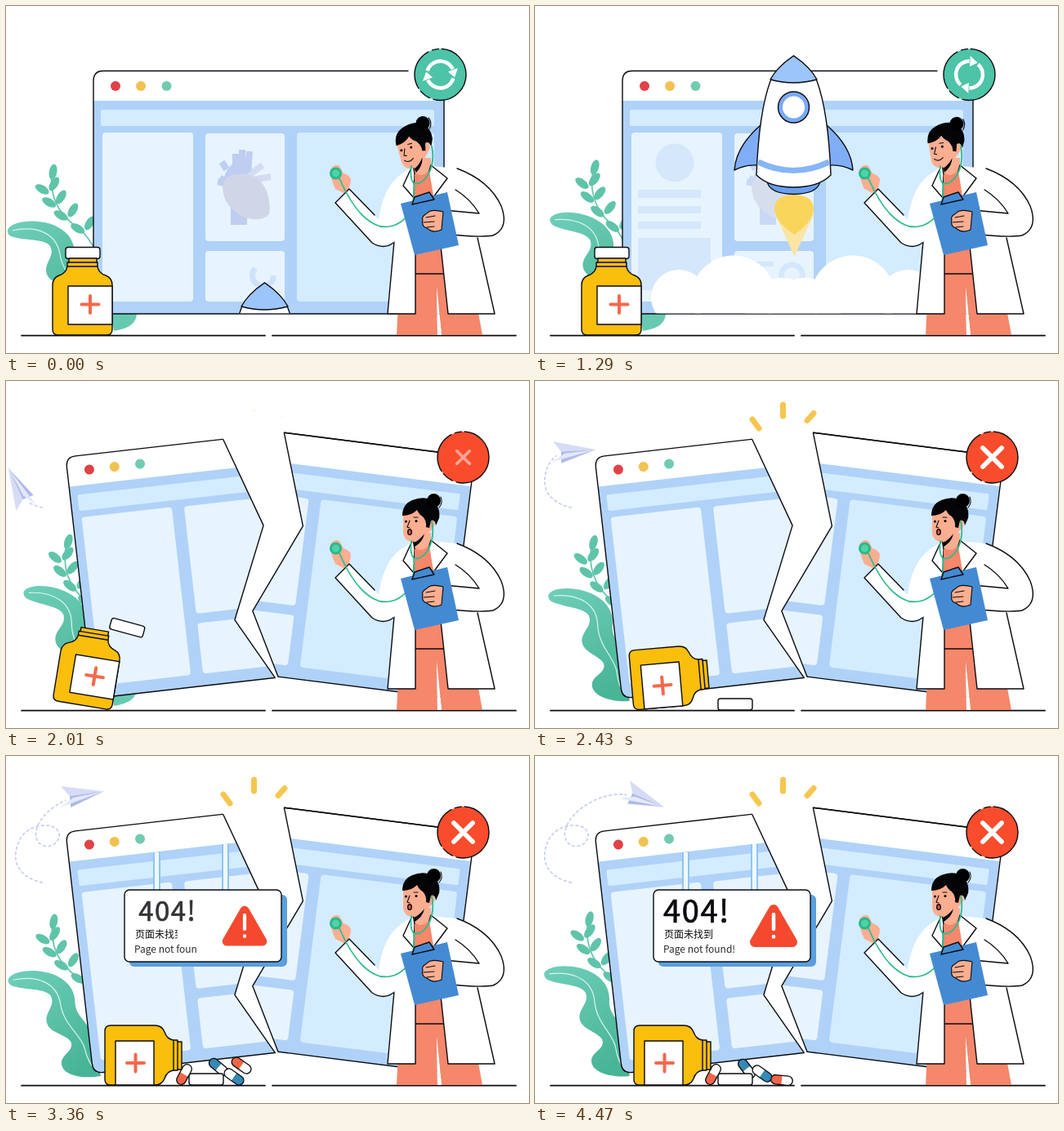
Animation, 640 px wide and 425 px high, one loop 4.5 s. Source, as an HTML page:

```html
<!DOCTYPE html>
<html lang="zh">
<head>
<meta charset="utf-8">
<title>404</title>
<style>
html, body { margin: 0; width: 100%; height: 100%; overflow: hidden; background: #fff; }
svg { display: block; width: 640px; height: 425px; }
.ln { fill: none; stroke: #0b0b10; stroke-width: 1.4; stroke-linecap: round; stroke-linejoin: round; }
.ol { stroke: #0b0b10; stroke-width: 1.4; stroke-linejoin: round; }
.thin { stroke-width: 1.1; }
.skin { fill: #fbae90; }
.suit { fill: #f5876b; }
.tube { fill: none; stroke: #2dbb90; stroke-width: 1.8; stroke-linecap: round; }
text { font-family: "Noto Sans CJK SC", "Noto Sans CJK", "Noto Sans", sans-serif; }
</style>
</head>
<body>
<svg viewBox="0 0 640 425">
<defs>
  <clipPath id="clipL"><path d="M90 70H301V80L338 190 290 301 331 377V390H90Z"/></clipPath>
  <clipPath id="clipR"><path d="M301 70V80L338 190 290 301 331 377V390H550V70Z"/></clipPath>
  <clipPath id="aboveSill"><path d="M0 -400H640V376.300H0Z"/></clipPath>
  <clipPath id="reveal">
    <rect id="wipe1" x="158" y="208" height="20"/>
    <rect id="wipe2" x="157" y="228" height="20"/>
  </clipPath>
  <linearGradient id="leafTone" x1="0" y1="0" x2=".7" y2="1">
    <stop offset="0" stop-color="#70cfba"/><stop offset="1" stop-color="#48b496"/>
  </linearGradient>
  <g id="win">
    <path fill="#fff" d="M119 377Q107 377 107 365V92Q107 80 119 80H536V377Z"/>
    <path fill="#b0d2f8" d="M107 116H536V377H119Q107 377 107 365Z"/>
    <rect x="116" y="127" width="408" height="20" rx="2" fill="#d3ecff"/>
    <g fill="#e7f4fe">
      <rect x="118" y="155" width="111" height="207" rx="4"/>
      <rect x="244" y="156" width="97" height="132" rx="4"/>
      <rect x="244" y="300" width="97" height="62" rx="4"/>
    </g>
    <rect x="356" y="155" width="168" height="207" rx="4" fill="#d3ecff"/>
    <circle cx="134" cy="98" r="6" fill="#e04246"/>
    <circle cx="165" cy="98" r="6" fill="#f2c250"/>
    <circle cx="196.500" cy="98" r="6" fill="#72cbb1"/>
    <path class="ln" d="M492 79.500H119Q107 79.500 107 92V365Q107 377 119 377H536V112"/>
  </g>
  <path id="crack" class="ln" d="M301 80 338 190 290 301 331 377"/>
  <g id="cap"><rect class="ol" x="-21" y="-7" width="42" height="14" rx="3" fill="#fff"/></g>
  <g id="fin"><path class="ol" fill="#80aef6" d="M276 146Q246 172 244 201Q258 194 272 195Z"/></g>
</defs>

<g id="frond" fill="#5fc4aa"><path fill="none" stroke="#5fc4aa" stroke-width="1.700" d="M118 318Q108 292 92 274Q52 250 56 205"/></g>
<g id="leaf">
  <path fill="url(#leafTone)" d="M2 274C8 262 42 260 62 270C78 278 84 290 84 304C86 322 102 324 104 346L116 392C96 396 70 392 68 378C66 366 84 362 79 350C72 340 50 340 49 324C49 312 60 306 54 294C46 284 22 288 6 282Q1 279 2 274Z"/>
  <path fill="none" stroke="#d9f5ec" stroke-width="1.200" d="M8 275C40 268 62 280 66 304C70 330 92 342 96 358Q100 376 112 388"/>
</g>
<path fill="#68c9b3" d="M128 376H160Q160 394 132 398Z"/>

<use id="whole" href="#win"/>
<g id="pieces">
  <g id="pieceL"><use href="#win" clip-path="url(#clipL)"/><use href="#crack"/></g>
  <g id="pieceR"><use href="#win" clip-path="url(#clipR)"/><use href="#crack"/><path class="ln" d="M301 79.500H536V112"/></g>
</g>

<g id="content">
  <g id="list" fill="#cfe2fa">
    <circle cx="171" cy="192" r="23.500"/>
    <rect x="126" y="225" width="77" height="10"/><rect x="126" y="245" width="77" height="9"/>
    <rect x="126" y="264" width="77" height="9"/><rect x="126" y="284" width="89" height="64"/>
    <rect x="258" y="313" width="34" height="6"/><rect x="258" y="323" width="21" height="6"/>
  </g>
  <circle id="dial" cx="314.500" cy="330" r="13" fill="none" stroke="#cfe2fa" stroke-width="7" pathLength="100"/>
  <g fill="none" stroke="#becdf0" stroke-width="8">
    <path d="M279 268V235Q272 214 262 211M281 205V181M289 205V176M296 204 298 178M268 217 259 215M270 200 264 191"/>
    <path stroke="#d3dcf2" d="M297 207 314 195M302 213 324 209"/>
    <path stroke="#becdf0" stroke-width="20" d="M285 236V268"/>
    <path stroke-width="15" d="M274 212Q281 190 295 206"/>
  </g>
  <path fill="#d0d6e8" d="M265 222Q266 206 286 206Q304 204 315 219Q325 236 322 255Q312 266 290 258Q266 246 265 222Z"/>
</g>

<g clip-path="url(#aboveSill)">
  <g id="rocket">
    <g id="flame">
      <path fill="#fbe5a3" d="M293 253H342L317.500 307Z"/>
      <path fill="#f9d55c" d="M317.500 280Q293 264 293 247Q294 232 317 231Q340 232 341 247Q341 264 317.500 280Z"/>
    </g>
    <path class="ol" fill="#6a9ff0" d="M284 214Q286 230 316.500 230.500Q347 230 349 214Z"/>
    <use href="#fin"/><use href="#fin" transform="matrix(-1 0 0 1 633 0)"/>
    <path class="ol" fill="#fff" d="M316.500 61Q296 75 288 92Q274 130 271 207Q286 222 316.500 222Q347 222 362 207Q359 130 345 92Q337 75 316.500 61Z"/>
    <path fill="none" stroke="#86b5f8" stroke-width="7" d="M273 191Q316 212 360 191"/>
    <path class="ol" fill="#9cc5fb" d="M316.500 61Q296 75 288 90Q316 98 345 90Q337 75 316.500 61Z"/>
    <circle class="ol" cx="316.500" cy="124" r="19" fill="#79aaf4"/>
    <circle cx="316.500" cy="124" r="13.500" fill="#fff"/>
  </g>
  <g id="clouds" fill="#fff"></g>
</g>

<path class="ln" style="stroke-width:1.700" d="M19 403.700H317M326 403.700H624"/>

<g id="sparks" stroke="#f6c64f" stroke-width="7" stroke-linecap="round">
  <path d="M-4 -5.500 4 5.500"/><path d="M0 -7V7"/><path d="M4 -4.500 -4 4.500"/>
</g>

<g id="flight">
  <path id="route" fill="none" d="M45 155C26 152 9 138 12 118C15 93 34 84 50 85C62 86 68 94 64 102C59 112 46 113 40 106C32 96 38 80 54 66C72 52 90 46 110 47L160 63"/>
  <path id="trail" fill="none" stroke="#c3cbef" stroke-width="1.600" stroke-dasharray="4 2.500"/>
  <g id="plane">
    <path fill="#d6dcf6" d="M48 0 -2 -18 6 -4Z"/>
    <path fill="#aebbe8" d="M48 0 6 -4 4 10Z"/>
    <path fill="#e3e8fb" d="M48 0 10 -1 -8 7Z"/>
  </g>
</g>

<g id="pillsBack"></g>
<use id="capUse" href="#cap"/>
<g id="pillsFront"></g>
<g id="bottle">
  <path class="ol" fill="#fabe0c" d="M77 309H111V314H112V319Q113 327 122 330Q130 333 130 342V396Q130 403 123 403H64Q57 403 57 396V342Q57 333 65 330Q74 327 75 319V314H77Z"/>
  <path class="ln" d="M77 314H111M75 319H112"/>
  <path class="ol" fill="#fff" d="M130 343H76V390H130Z"/>
  <path stroke="#f5694c" stroke-width="4" stroke-linecap="round" d="M92.500 365.500H113.500M103 355V376"/>
</g>

<g id="sign">
  <g id="rods">
    <path fill="#8fc4f2" d="M180 118H189V166H180ZM264 108H273V166H264Z"/>
    <path fill="#eef9ff" d="M182 118H187V166H182ZM266 108H271V166H266Z"/>
  </g>
  <g id="board">
    <rect x="151" y="170" width="193" height="88" rx="6" fill="#5a9fdc"/>
    <rect class="ol" x="145" y="164" width="192" height="88" rx="6" fill="#fff"/>
  </g>
  <text id="code" x="157" y="204" font-size="38" letter-spacing="1.600" fill="#0b0b10" stroke="#0b0b10" stroke-width=".7">404!</text>
  <g clip-path="url(#reveal)">
    <text x="158" y="223" font-size="12" fill="#0b0b10">页面未找到</text>
    <text x="157" y="240.500" font-size="12" fill="#2a2a2e">Page not found!</text>
  </g>
  <g id="warn">
    <path fill="#f4492e" stroke="#f4492e" stroke-width="12" stroke-linejoin="round" d="M292 188 315 228H269Z"/>
    <path stroke="#fff" stroke-width="4.500" stroke-linecap="round" d="M292 194V212M292 221V221.500"/>
  </g>
</g>

<g id="badge">
  <circle id="disc" r="31.500"/>
  <circle class="ln" r="31.500" stroke-dasharray="58 5 14 4 52 5 8 4"/>
  <g id="arrows">
    <g id="half">
      <path fill="none" stroke="#fff" stroke-width="4.500" d="M-15.900 -4.300A16.500 16.500 0 0 1 15 -6.900"/>
      <path fill="#fff" d="M21.300 -8.600 9.300 -3.700 17.500 3Z"/>
    </g>
    <use href="#half" transform="rotate(180)"/>
  </g>
  <path id="cross" stroke="#fff" stroke-width="5.500" stroke-linecap="round" d="M-11 -11 11 11M11 -11 -11 11"/>
</g>

<g id="doctor">
  <path class="suit" d="M480 365 478 403H528L527 345 533 403H583L576 365 540 325H500Z"/>
  <path fill="#fff" d="M527 343 528 403H533Z"/>
  <path class="suit" d="M498 196H522L536 230 537 328H501Z"/>
  <path class="ln" d="M501 328H537"/>
  <path fill="#fff" d="M498 196 487 204Q474 214 470 236L479 244 467 377H501V250Z"/>
  <path fill="#fff" d="M521 196 552 199Q590 212 606 245Q616 272 596 281L577 284 598 377H541L532 290 524 225Z"/>
  <path class="ln" d="M479 244 467 377H501V300M552 199Q592 214 606 245Q616 272 596 281Q580 284 533 279L536 250 579 254Q568 236 550 225M577 284 598 377H541L532 294"/>
  <g id="arm">
    <path class="skin" d="M397 200Q402 193 408 196L413 205Q420 207 422 212Q422 222 415 230L403 224Q397 212 397 200Z"/>
    <path fill="#fff" d="M420 224 456 262Q462 216 490 202L500 262 474 290Q462 299 448 290L403 241Z"/>
    <path class="ln" d="M474 290Q462 299 448 290L403 241 420 224 451 256"/>
    <path class="tube" d="M492 256Q478 273 458 270Q430 262 408 211"/>
    <circle cx="403.500" cy="205" r="7.500" fill="#28b98b"/><circle cx="403.500" cy="205" r="4.500" fill="#4fd3a6"/>
  </g>
  <path class="skin" d="M498 186H520V198Q510 213 499 203Z"/>
  <path class="ol" fill="#fff" d="M498 194 486 220 499 235 500 206ZM520 195 540 211 523 234 514 215Z"/>
  <path class="suit" d="M500 206Q508 212 518 202L523 232H500Z"/>
  <g id="head">
    <path class="skin" d="M486 160V186Q487 196 497 197L510 193 522 181Q527 176 523 169L515 155H490Z"/>
    <path fill="#050508" d="M485 165Q485 151 497 146Q512 140 523 147Q532 155 530 168L526 177Q525 169 520 171L518 180 514 179Q515 172 510 166Q505 163 503 158Q496 165 485 165ZM499 198Q506 195 512 187Q510 197 500 203Z"/>
    <circle cx="523.500" cy="146.500" r="8.500"/>
    <path class="ln thin" d="M532 142Q535 149 530 155"/>
    <path class="ln thin" d="M494 171 491 179 494 180M499 167 504 167"/>
    <circle cx="489.500" cy="172" r="1.500"/><circle cx="502" cy="171.500" r="1.500"/>
    <path id="smile" class="ln thin" d="M490 185Q495 190 501 185"/>
    <ellipse id="gasp" class="ol" cx="494" cy="185" rx="2.300" ry="3.300" fill="#e4573e"/>
  </g>
  <path class="tube" d="M521 172Q525 190 517 206Q508 220 499 217Q494 212 496 196M499 217Q502 240 490 258"/>
  <g id="clip">
    <path fill="#448ad2" d="M483 242 540 228 554 293 500 305Z"/>
    <path class="ol" fill="#448ad2" d="M497 243 500 234 518 228 524 237Z"/>
    <path class="ol skin thin" d="M535 252Q520 248 515 254Q508 258 510 262Q508 270 515 272Q523 279 533 274Z"/>
    <path class="ln thin" d="M514 259 525 257M511 265 524 264M515 271 524 270"/>
  </g>
</g>
</svg>
<script>
const LOOP = 4500;
const $ = id => document.getElementById(id);
const set = (el, attrs) => { for (const k in attrs) el.setAttribute(k, attrs[k]); };
const move = (id, value) => $(id).setAttribute('transform', value);
const fade = (id, value) => { $(id).style.opacity = value; };
const show = (id, on) => { $(id).style.display = on ? '' : 'none'; };
const seg = (t, a, b) => Math.min(1, Math.max(0, (t - a) / (b - a)));
const mix = (a, b, p) => a + (b - a) * p;
const smooth = p => p * p * (3 - 2 * p);
const easeOut = p => 1 - (1 - p) ** 3;
const overshoot = p => 1 + 2.2 * (p - 1) ** 3 + 1.2 * (p - 1) ** 2;
const scaleAt = (x, y, s) => `translate(${x} ${y}) scale(${s}) translate(${-x} ${-y})`;

// Each key is [time, ...values]
function track(t, keys) {
  let i = 0;
  while (i < keys.length - 2 && t > keys[i + 1][0]) i++;
  const [a, b] = [keys[i], keys[i + 1]], p = seg(t, a[0], b[0]);
  return a.slice(1).map((v, j) => mix(v, b[j + 1], p));
}

function add(parent, tag, attrs) {
  const el = document.createElementNS('http://www.w3.org/2000/svg', tag);
  set(el, attrs);
  return parent.appendChild(el);
}

// Leaflets in pairs along the stem
const leaflet = (x, y, turn, reach) => add($('frond'), 'ellipse',
  { rx: 4.8, ry: 9.5, transform: `translate(${x} ${y}) rotate(${turn}) translate(0 ${-reach})` });
leaflet(56, 212, 10, 9);
for (let i = 0; i < 4; i++) {
  const x = 52 + 5.5 * i + 3 * i * i, y = 229 + 16 * i;
  leaflet(x, y, -60, 9);
  leaflet(x, y, 32, 13);
}

const clouds = [];
for (const side of [-1, 1]) for (let i = 0; i < 3; i++)
  clouds.push({ side, i, el: add($('clouds'), 'circle', {}) });
const cloudBase = add($('clouds'), 'rect', { y: 352, height: 26 });

const RED = '#ef6646', BLUE = '#3489b5';
const pills = [
  { tone: RED, keys: [[2560, 200, 378, 0], [2850, 228, 379, 25], [3360, 218, 390, -62], [3750, 218, 390, -62]] },
  { tone: BLUE, keys: [[2560, 196, 370, -40], [2850, 238, 369, 110], [3360, 260, 381, 40], [3750, 259, 383, 52]] },
  { tone: BLUE, keys: [[2600, 196, 372, 0], [2850, 247, 381, 150], [3360, 279, 393, 215], [3750, 278, 389, 215]] },
  { tone: RED, keys: [[2560, 200, 372, 0], [2850, 257, 381, 10], [3360, 288, 379, 35], [3750, 312, 397, 65], [4200, 302, 397, 6]] }
];
pills.forEach((pill, i) => {
  const g = pill.el = add($(i ? 'pillsBack' : 'pillsFront'), 'g', {});
  add(g, 'rect', { x: -14, y: -6, width: 28, height: 12, rx: 6, fill: '#fff' });
  add(g, 'path', { d: 'M0 -6H-8A6 6 0 0 0 -8 6H0Z', fill: pill.tone });
  add(g, 'rect', { x: -14, y: -6, width: 28, height: 12, rx: 6, class: 'ln' });
});

const capKeys = [[1850, 94, 302.5, 0], [1930, 122, 292, 7], [2010, 148, 302, 15], [2150, 188, 328, 60], [2400, 245, 396, 180]];
const sparkSpots = [[270, 52.5], [303.5, 36], [337, 44]];
const route = $('route'), routeLength = route.getTotalLength();
const at = length => route.getPointAtLength(Math.min(routeLength, length));

function drawPlants(t) {
  const sway = (1 - Math.cos(2 * Math.PI * t / 3600)) / 2;
  move('leaf', `rotate(${9.5 * sway} 115 390)`);
  move('frond', `rotate(${8.5 * sway} 112 330)`);
}

function drawWindow(t) {
  const p = overshoot(seg(t, 1640, 1900)), broken = t > 1640;
  show('whole', !broken);
  show('pieces', broken);
  move('pieceL', `translate(${-.3 * p} ${11.8 * p}) rotate(${-6.5 * p} 107 377)`);
  move('pieceR', `translate(${2 * p} ${-14.8 * p}) rotate(${7.2 * p} 331 377)`);
  fade('content', 1 - seg(t, 1180, 1560));
  fade('list', seg(t, 100, 560));
  set($('dial'), { 'stroke-dasharray': `${mix(62, 100, seg(t, 0, 400))} 100` });
}

function drawRocket(t) {
  const tip = t < 690 ? mix(339, 347, smooth(seg(t, 0, 600)))
    : t < 1320 ? mix(347, 61, smooth(seg(t, 690, 1060)))
    : mix(61, -270, seg(t, 1320, 1720) ** 2);
  move('rocket', `translate(0 ${tip - 61})`);
  fade('flame', seg(t, 760, 860));
  move('flame', `translate(0 230) scale(1 ${1 + .05 * Math.sin((t - 1290) / 35)}) translate(0 -230)`);

  const grow = easeOut(seg(t, 230, 640)), spread = smooth(seg(t, 720, 1150));
  const sink = 1 - smooth(seg(t, 1450, 1800)), size = grow * sink;
  for (const { side, i, el } of clouds) {
    const off = [mix(95, 73, spread), mix(32, 14, spread), mix(95, 140, spread)][i];
    const y = [mix(349, 357, spread), mix(364, 378, spread), 357][i];
    const r = [51.5, mix(28, 45, spread), mix(10, 34, spread)][i];
    set(el, { cx: 316 + side * off * (.7 + .3 * grow), cy: mix(385, y, size), r: r * size });
  }
  const half = 165 * spread * size;
  set(cloudBase, { x: 316 - half, width: 2 * half });
  fade('clouds', sink);
}

function drawBadge(t) {
  const p = seg(t, 1640, 1900), m = overshoot(p);
  move('badge', `translate(${mix(531.5, 559.5, m)} ${mix(84, 93.5, m)})`);
  $('disc').setAttribute('fill', `rgb(${mix(77, 248, p)} ${mix(195, 76, p)} ${mix(168, 44, p)})`);
  move('arrows', `rotate(${295 * easeOut(seg(t, 0, 660)) + 180 * smooth(seg(t, 1320, 1660))})`);
  fade('arrows', 1 - seg(t, 1640, 1800));
  const x = seg(t, 1950, 2200);
  move('cross', `scale(${mix(.25, 1.05, easeOut(x))})`);
  fade('cross', Math.min(1, x * 2));
}

function drawDoctor(t) {
  const lean = t < 1110 ? 1.15 * Math.sin(Math.PI * t / 1110) ** 2 : 0;
  move('doctor', `translate(0 290) skewX(${3.3 * lean}) translate(0 -290)`);
  move('arm', `translate(${-9 * lean} ${2 * lean})`);
  move('clip', `translate(${-5 * lean} ${-2 * lean}) rotate(${3 * lean} 518 265)`);
  move('head', `rotate(${-15 * (1 - smooth(seg(t, 1000, 1640)))} 505 196)`);
  show('smile', t < 1660);
  show('gasp', t >= 1660);
}

function drawBottle(t) {
  const p = seg(t, 1850, 2350) ** 2;
  const bounce = 5 * Math.sin(Math.PI * seg(t, 2350, 2500));
  move('bottle', `translate(${-9 * p} 0) rotate(${90 * p - bounce} 130 403)`);
  const [x, y, r] = track(t, capKeys);
  move('capUse', `translate(${x} ${y}) rotate(${r})`);
  for (const pill of pills) {
    const [px, py, pr] = track(t, pill.keys);
    set(pill.el, { transform: `translate(${px} ${py}) rotate(${pr}) scale(.95)`, visibility: t < 2560 ? 'hidden' : 'visible' });
  }
}

function drawSparks(t) {
  const s = t < 2550 ? seg(t, 1960, 2280) : t < 2860 ? 1 - seg(t, 2550, 2860) : seg(t, 2860, 3200);
  [...$('sparks').children].forEach((el, i) => {
    const [x, y] = sparkSpots[i];
    set(el, { transform: `translate(${x} ${y}) scale(${smooth(s)})` });
  });
}

function drawPlane(t) {
  show('flight', t >= 1850);
  const length = Math.min(routeLength - 50, Math.max(0, (t - 1890) * .16));
  const a = at(length), b = at(length + 32);
  const steps = Math.ceil(length / 2);
  let d = 'M45 155';
  for (let i = 1; i <= steps; i++) {
    const q = at(length * i / steps);
    d += `L${q.x.toFixed(1)} ${q.y.toFixed(1)}`;
  }
  set($('trail'), { d });
  const turn = Math.atan2(b.y - a.y, b.x - a.x) * 180 / Math.PI;
  move('plane', `translate(${a.x} ${a.y}) rotate(${turn})`);
  fade('plane', seg(t, 1850, 1950));
}

function drawSign(t) {
  show('sign', t >= 2640);
  const drop = seg(t, 2640, 2760);
  move('rods', `translate(0 ${mix(-48, 0, drop)})`);
  fade('rods', drop);
  move('board', scaleAt(241, 208, mix(.3, 1, easeOut(seg(t, 2660, 2960)))));
  fade('board', seg(t, 2660, 2740));
  const warn = seg(t, 3020, 3420);
  move('warn', scaleAt(292, 210, smooth(warn)));
  fade('warn', Math.min(1, warn * 2));
  const code = seg(t, 3120, 3840);
  move('code', scaleAt(197, 190, mix(.8, 1, code)));
  fade('code', Math.min(1, code * 2.5));
  // Both lines wipe in from the left at the same pace
  const wipe = seg(t, 2980, 3430);
  set($('wipe1'), { width: 61 * wipe });
  set($('wipe2'), { width: 90 * wipe });
}

const parts = [drawPlants, drawWindow, drawRocket, drawBadge, drawDoctor, drawBottle, drawSparks, drawPlane, drawSign];
const start = performance.now();
function frame() {
  const t = (performance.now() - start) % LOOP;
  for (const draw of parts) draw(t);
  requestAnimationFrame(frame);
}
frame();
</script>
</body>
</html>
```
